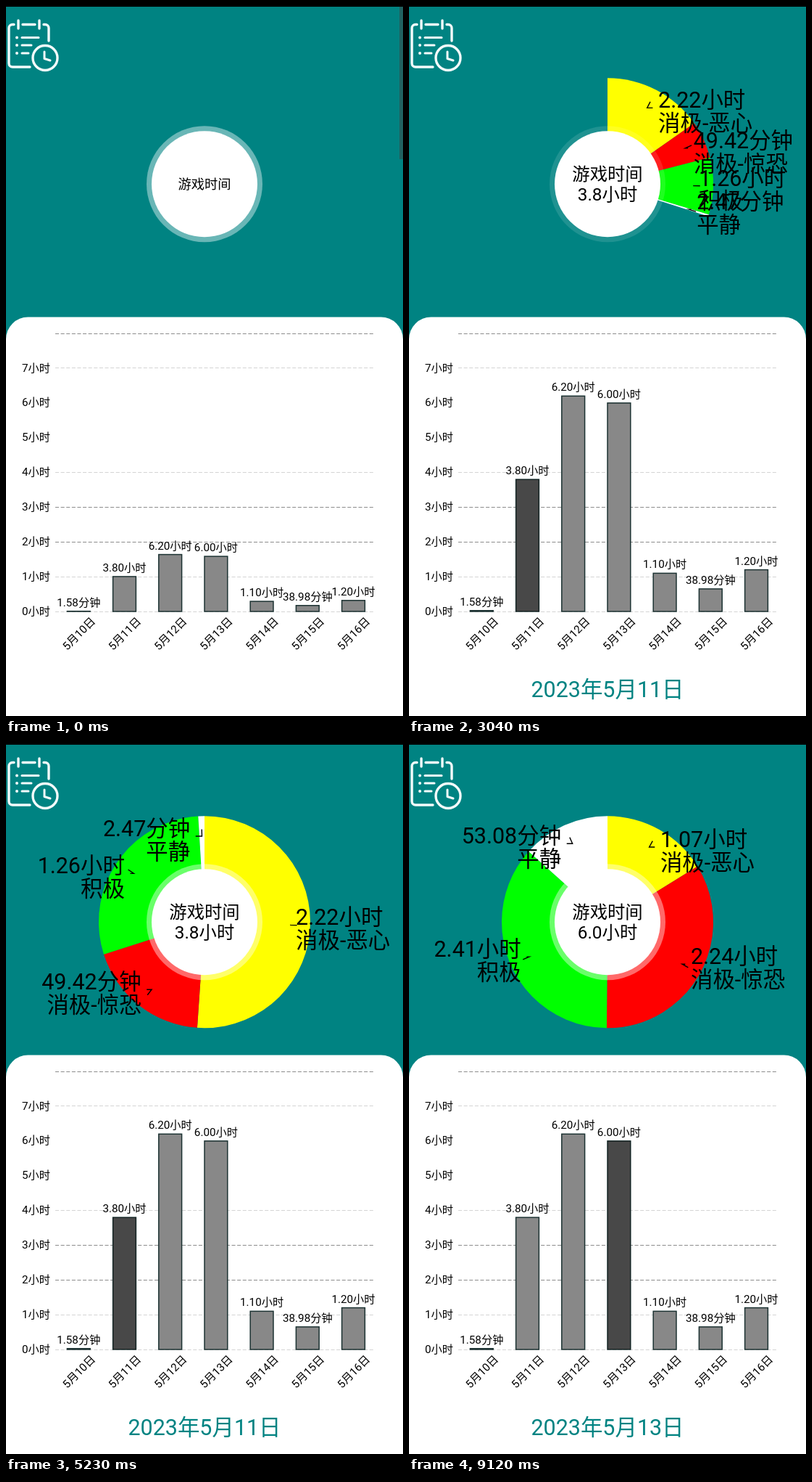
An HTML page with a canvas for the animation above (9650 ms loop, 548 by 978 pixels).

```html
<!DOCTYPE html>
<html lang="zh-CN">
<head>
<meta charset="utf-8">
<style>
html, body { margin: 0; width: 100%; height: 100%; overflow: hidden; background: #008382; }
canvas { display: block; width: 548px; height: 978px; }
</style>
</head>
<body>
<canvas id="stage"></canvas>
<script>
const W = 548, H = 978, LOOP = 9650, TAU = Math.PI * 2;
const TEAL = '#008382';
const FONT = 'Roboto, "Noto Sans CJK SC", "Noto Sans CJK", sans-serif';
const SMALL = 15.22, LARGE = 30.44;

const canvas = document.getElementById('stage');
const ctx = canvas.getContext('2d');
const dpr = window.devicePixelRatio || 1;
canvas.width = W * dpr;
canvas.height = H * dpr;

const chart = { left: 68, right: 509, base: 834, hour: 47.86, x0: 100.3, step: 63.2, bar: 31.8 };
const days = [
  [1.58 / 60, '1.58分钟'], [3.8, '3.80小时'], [6.2, '6.20小时'], [6, '6.00小时'],
  [1.1, '1.10小时'], [38.98 / 60, '38.98分钟'], [1.2, '1.20小时']
];

const pie = { x: 274, y: 245.2, r: 146, hole: 73, ring: 80 };
const moods = [
  ['消极-恶心', '#ffff00'], ['消极-惊恐', '#ff0000'], ['积极', '#00ff00'], ['平静', '#ffffff']
];
const picks = [
  { at: 2270, start: 2302, day: 1, total: '3.8小时',
    hours: [2.22, 49.42 / 60, 1.26, 2.47 / 60],
    text: ['2.22小时', '49.42分钟', '1.26小时', '2.47分钟'] },
  { at: 6280, start: 6247, day: 3, total: '6.0小时',
    hours: [1.07, 2.24, 2.41, 53.08 / 60],
    text: ['1.07小时', '2.24小时', '2.41小时', '53.08分钟'] }
];

const clamp = v => Math.min(1, Math.max(0, v));
const ease = p => (1 - Math.cos(Math.PI * clamp(p))) / 2;

function text(str, x, y, size, align = 'center', color = '#000') {
  ctx.font = size + 'px ' + FONT;
  ctx.textAlign = align;
  ctx.fillStyle = color;
  ctx.fillText(str, x, y);
}

function line(points, color, width) {
  ctx.beginPath();
  points.forEach(([x, y], i) => i ? ctx.lineTo(x, y) : ctx.moveTo(x, y));
  ctx.strokeStyle = color;
  ctx.lineWidth = width;
  ctx.stroke();
}

function disc(x, y, r, color) {
  ctx.beginPath();
  ctx.arc(x, y, r, 0, TAU);
  ctx.fillStyle = color;
  ctx.fill();
}

function drawIcon() {
  const white = '#f4fbfb', weight = 3.4;
  ctx.lineCap = 'round';
  ctx.lineJoin = 'round';
  ctx.strokeStyle = white;
  ctx.lineWidth = weight;
  ctx.beginPath();
  ctx.moveTo(11, 25.5);
  ctx.arcTo(4, 25.5, 4, 33, 5);
  ctx.lineTo(4, 78);
  ctx.arcTo(4, 84, 10, 84, 5);
  ctx.lineTo(33, 84);
  ctx.moveTo(23, 25.5);
  ctx.lineTo(40, 25.5);
  ctx.moveTo(52, 25.5);
  ctx.arcTo(59, 25.5, 59, 32, 5);
  ctx.lineTo(59, 48);
  ctx.stroke();
  for (const x of [17, 46]) line([[x, 20], [x, 31]], white, weight);
  [[43.5, 45], [54, 35], [65, 31]].forEach(([y, end]) => {
    line([[22, y], [end, y]], white, 3);
    disc(15, y, 2, white);
  });
  ctx.beginPath();
  ctx.arc(54, 71.5, 17, 0, TAU);
  ctx.strokeStyle = white;
  ctx.lineWidth = weight;
  ctx.stroke();
  line([[53, 63], [53, 72.5], [61, 75]], white, 3);
  ctx.lineCap = 'butt';
  ctx.lineJoin = 'miter';
}

function drawBackdrop(t) {
  ctx.fillStyle = TEAL;
  ctx.fillRect(0, 0, W, H);
  ctx.fillStyle = '#000';
  ctx.fillRect(0, 0, W, 1);
  const bar = 1 - clamp((t - 250) / 250);
  ctx.fillStyle = `rgba(66, 66, 66, ${0.5 * bar})`;
  ctx.fillRect(543, 1, 5, 210);
  ctx.fillStyle = '#fff';
  ctx.beginPath();
  ctx.roundRect(0, 428.5, W, H, 30.4);
  ctx.fill();
  drawIcon();
}

function drawGrid() {
  const { left, right, base, hour } = chart;
  ctx.setLineDash([5.07, 2.54]);
  for (let h = 0; h <= 8; h++) {
    const y = Math.floor(base - h * hour) + 0.5;
    if (h !== 5 && h !== 6) {
      const dark = h === 2 || h === 3 || h === 8;
      line([[left, y], [right, y]], dark ? '#8c8c8c' : '#d4d4d4', 1);
    }
  }
  ctx.setLineDash([]);
  for (let h = 0; h < 8; h++) text(h + '小时', 61, base - h * hour + 4.6, SMALL, 'right');
}

function drawBars(t, pick) {
  const { x0, step, bar, base, hour } = chart;
  const grow = ease((t + 1020) / 2970);
  days.forEach(([hours], i) => {
    const x = x0 + i * step - bar / 2;
    const h = hours * hour * grow;
    ctx.fillStyle = '#888';
    ctx.fillRect(x, base - h, bar, h);
    ctx.strokeStyle = '#1c3232';
    ctx.lineWidth = 1.5;
    ctx.strokeRect(x, base - h, bar, h);
    if (pick && pick.day === i) {
      ctx.fillStyle = 'rgba(0, 0, 0, 0.47)';
      ctx.fillRect(x, base - h, bar, h);
    }
  });
  days.forEach(([hours, label], i) => {
    const x = x0 + i * step;
    text(label, x, base - hours * hour * grow - 6.9, SMALL);
    ctx.save();
    ctx.translate(x + 0.2, 864.5);
    ctx.rotate(-Math.PI / 4);
    text(`5月${10 + i}日`, 0, 5.4, SMALL);
    ctx.restore();
  });
}

// Angles run clockwise from the top.
function polar(angle, r) {
  return [pie.x + r * Math.sin(angle), pie.y - r * Math.cos(angle)];
}

function drawSlices(pick, phase) {
  const sum = pick.hours.reduce((a, b) => a + b);
  let from = 0;
  return pick.hours.map((hours, i) => {
    const sweep = hours / sum * TAU * phase;
    ctx.beginPath();
    ctx.moveTo(pie.x, pie.y);
    ctx.arc(pie.x, pie.y, pie.r, from - TAU / 4, from + sweep - TAU / 4);
    ctx.closePath();
    ctx.fillStyle = moods[i][1];
    ctx.fill();
    from += sweep;
    return from - sweep / 2;
  });
}

function drawLabels(pick, middles) {
  middles.forEach((angle, i) => {
    const side = angle >= Math.PI ? -1 : 1;
    const [x, y] = polar(angle, 118.26);
    const end = x + side * 8.76 * Math.abs(Math.cos(angle));
    line([polar(angle, 127.75), [x, y], [end, y]], '#000', 1.4);
    const align = side < 0 ? 'right' : 'left';
    text(pick.text[i], end + side * 7.61, y, LARGE, align);
    text(moods[i][0], end + side * 7.61, y + 31.8, LARGE, align);
  });
}

function drawPie(t, pick) {
  const phase = pick ? ease((t - pick.start) / 2005) : 1;
  const middles = pick ? drawSlices(pick, phase) : [];
  disc(pie.x, pie.y, pie.ring, `rgba(255, 255, 255, ${0.412 * phase})`);
  disc(pie.x, pie.y, pie.hole, '#fff');
  if (!pick) {
    text('游戏时间', pie.x, 252, 18.27);
    return;
  }
  drawLabels(pick, middles);
  text('游戏时间', pie.x, 239.8, 24.36);
  text(pick.total, pie.x, 268.3, 24.36);
  text(`2023年5月${10 + pick.day}日`, pie.x, 952, LARGE, 'center', TEAL);
}

function draw(t) {
  const pick = picks.filter(p => t >= p.at).pop();
  ctx.setTransform(dpr, 0, 0, dpr, 0, 0);
  drawBackdrop(t);
  drawGrid();
  drawBars(t, pick);
  drawPie(t, pick);
}

const begin = performance.now();
function tick() {
  draw((performance.now() - begin) % LOOP);
  requestAnimationFrame(tick);
}
tick();
</script>
</body>
</html>
```
